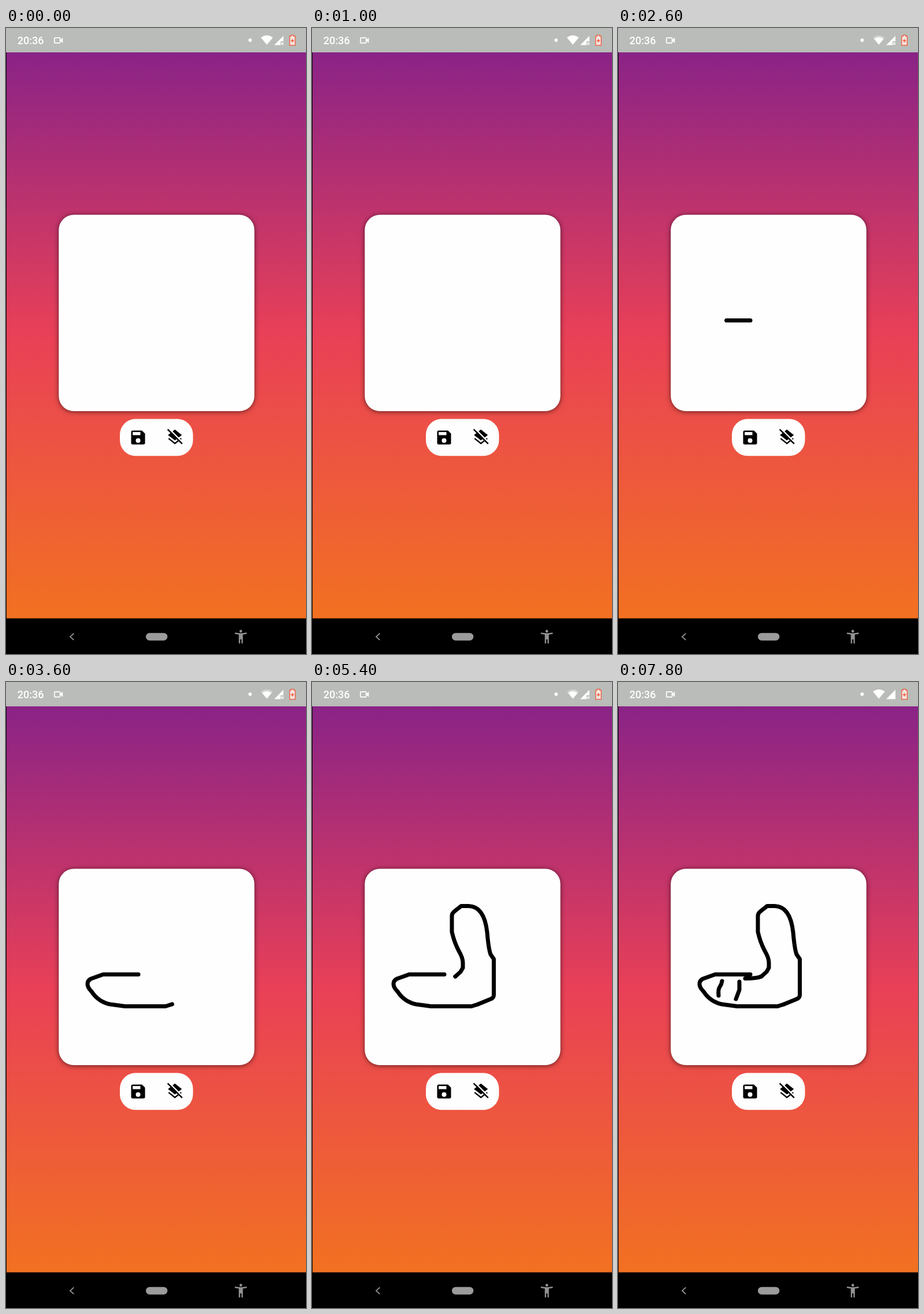
Write an HTML page that moves like this. It is 519 px wide and 1080 px high and loops after 8000 ms.

```html
<!DOCTYPE html>
<html lang="en">
<head>
<meta charset="utf-8">
<title>Sketch pad</title>
<style>
  html, body { margin: 0; width: 100%; height: 100%; overflow: hidden; background: #000; }
  svg { display: block; width: 100%; height: 100%; }
  .card { filter: drop-shadow(0 1px 4px rgba(0, 0, 0, .6)); }
  .clock { font: 500 18px Roboto, sans-serif; }
  .paper { fill: #fdfefd; }
  .line { fill: none; stroke: #000; stroke-width: 1.8; }
  .gap { stroke: #fdfefd; }
  #ink { fill: none; stroke: #000; stroke-width: 7; stroke-linecap: round; stroke-linejoin: round; }
</style>
</head>
<body>
<svg viewBox="0 0 519 1080">
  <defs>
    <linearGradient id="sky" x1="0" y1="0" x2="0" y2="1">
      <stop offset="0" stop-color="#8a2387"/>
      <stop offset=".5" stop-color="#e94057"/>
      <stop offset="1" stop-color="#f27121"/>
    </linearGradient>
    <path id="fan" d="M-10.3-12.2Q0-20 10.3-12.2L0 0z"/>
  </defs>
  <rect width="519" height="1080"/>
  <rect x="1" y="42" width="518" height="976.5" fill="url(#sky)"/>

  <!-- status bar -->
  <rect width="519" height="42" fill="#b9bcb8"/>
  <g fill="#fff">
    <text class="clock" x="19.7" y="28">20:36</text>
    <rect x="83.8" y="16.8" width="9.8" height="9" rx="1" fill="none" stroke="#fff" stroke-width="1.7"/>
    <path d="M94 20.5l4.2-4v9.6l-4.2-4z"/>
    <circle cx="422.3" cy="21" r="2.9"/>
    <g transform="translate(451.3 28.8)">
      <use href="#fan" opacity=".35"/>
      <use href="#fan" id="wifi"/>
    </g>
    <path id="full" d="M480 13.5v16h-16z"/>
    <g id="weak">
      <path d="M480 13.5V23h-5v6.5h-11z"/>
      <path d="M476 25l4 4m0-4l-4 4" stroke="#fff" stroke-width="1.3"/>
    </g>
  </g>
  <g fill="#f4e4df" stroke="#f0583c" stroke-width="1.3">
    <path d="M490.7 14.2h2.6v-1.9h4.4v1.9h2.6v15.6h-9.6z"/>
    <path d="M492.7 22h5.6m-2.8-2.8v5.6" stroke-width="1.6"/>
  </g>

  <!-- drawing card and tools -->
  <rect class="card paper" x="91.3" y="322.3" width="338.4" height="338.7" rx="26"/>
  <rect class="paper" x="197" y="674.5" width="126.5" height="63.7" rx="27"/>
  <g transform="translate(212.5 690.4) scale(1.335)">
    <path d="M5 3h12l4 4v12a2 2 0 0 1-2 2H5a2 2 0 0 1-2-2V5a2 2 0 0 1 2-2z"/>
    <rect class="paper" x="5" y="5" width="10" height="4"/>
    <circle class="paper" cx="12" cy="16" r="3"/>
  </g>
  <g transform="translate(276.2 690.2) scale(1.335)">
    <path d="M12 2l9 7-9 7-9-7z"/>
    <path class="line" d="M3.8 13.4l8.2 6.4 8.2-6.4"/>
    <path class="line gap" d="M4 .5l17 17"/>
    <path class="line" d="M2.6 1.6l18.8 18.8"/>
  </g>
  <g id="ink"></g>

  <!-- navigation bar -->
  <path d="M117.3 1044.5l-6.3 5.7 6.3 5.7" fill="none" stroke="#929292" stroke-width="1.8"/>
  <rect x="242" y="1043.7" width="37.3" height="13" rx="6.5" fill="#9b9b9b"/>
  <g transform="translate(392.2 1036) scale(1.17)" fill="#929292">
    <circle cx="12" cy="4" r="2"/>
    <path d="M3.2 7q8.8 2 17.600 0" fill="none" stroke="#929292" stroke-width="2"/>
    <path d="M9 8h6v14h-2v-6h-2v6H9z"/>
  </g>
</svg>
<script>
const LOOP = 8000, STEP = 200;
const $ = id => document.getElementById(id);

// Each piece is drawn at an even pen speed between its two times.
const pieces = [
  pen(2400, 2600, 'M229 504.5H188'),
  pen(2600, 3600, 'M188 504.5H168L147 512Q141 515 141 521T148 534Q160 552 180 556L206 559.5H276L287 556'),
  pen(3600, 5400, `M287 556L309 547Q314.5 545 314.5 540V478L309 470Q305.5 461 303 432Q298 387 271 386.5
    H258L246 396Q242 399 242 404V431Q246 449 254 464Q261 476 261 484V493L257 500L248 508`),
  pen(5400, 5600, 'M248 508Q240 511.5 220 511.5'),
  pen(6800, 7200, 'M180 516Q179 522 176 526T174 541'),
  pen(7400, 7800, 'M210 517V531L204 547')
];

function pen(from, to, d) {
  const el = document.createElementNS('http://www.w3.org/2000/svg', 'path');
  el.setAttribute('d', d);
  el.setAttribute('pathLength', 1);
  $('ink').append(el);
  return { el, from, to };
}

function show(el, on) {
  el.style.visibility = on ? 'visible' : 'hidden';
}

function render(now) {
  const t = Math.floor(now % LOOP / STEP) * STEP;
  for (const { el, from, to } of pieces) {
    const done = Math.min(1, (t - from) / (to - from));
    show(el, done >= 0);
    if (done >= 0) el.style.strokeDasharray = `${done + 0.001} 2`;
  }
  const restored = t >= 7200;
  $('wifi').setAttribute('transform', `scale(${t < 1800 || restored ? 1 : 0.8})`);
  show($('full'), restored);
  show($('weak'), !restored);
}

const start = performance.now();
function tick() {
  render(performance.now() - start);
  requestAnimationFrame(tick);
}
tick();
</script>
</body>
</html>
```
